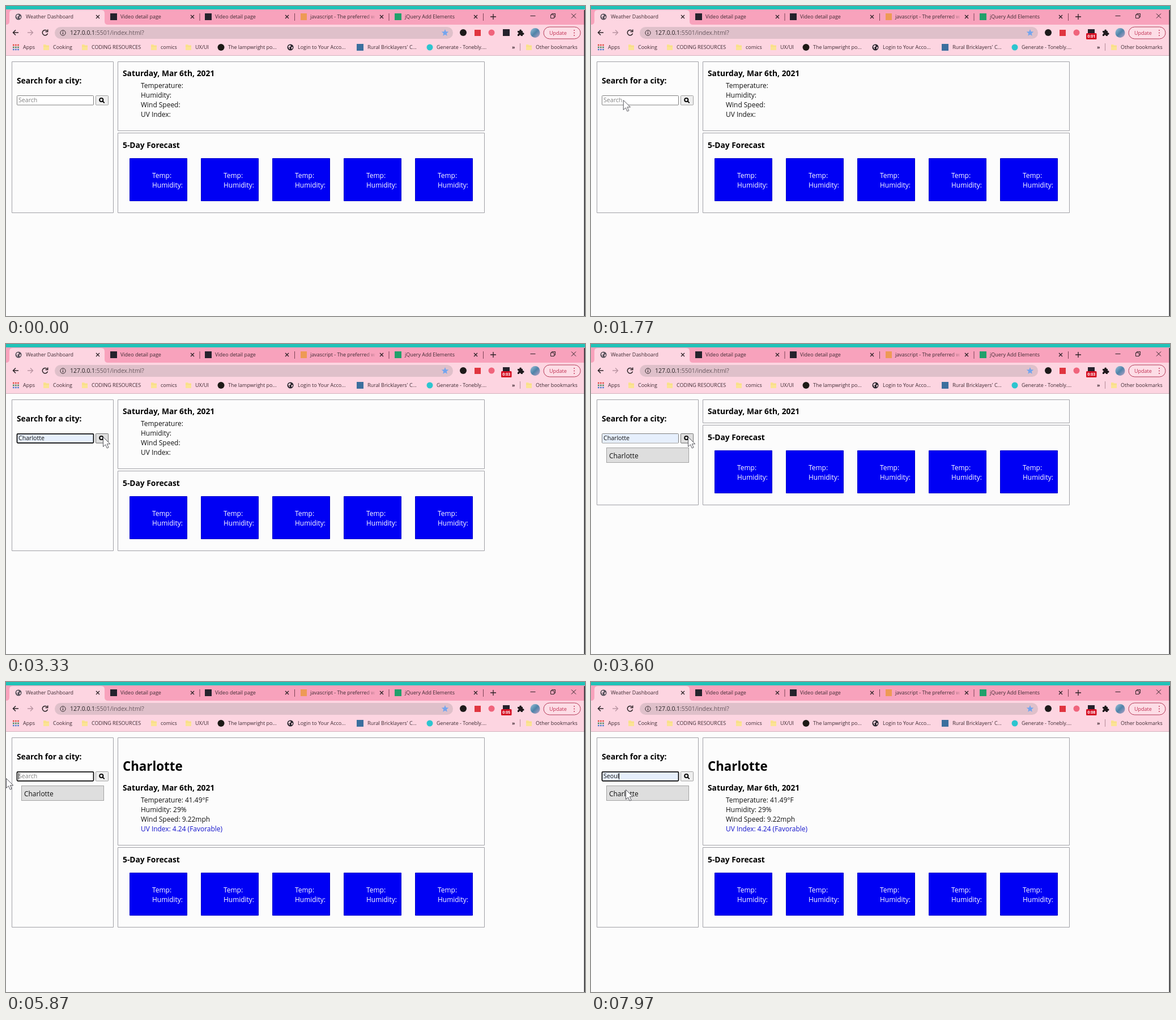
Write an HTML page that moves like this. It is 1022 by 548 pixels and loops after 8 s.

```html
<!DOCTYPE html>
<html lang="en">
<head>
<meta charset="utf-8">
<title>Weather Dashboard</title>
<style>
  html, body { margin: 0; width: 100%; height: 100%; overflow: hidden; background: #fcfcfc; }
  svg { display: block; }
  text { font-family: "Open Sans", "Noto Sans", sans-serif; white-space: pre; }
  .ui { font-size: 8.98px; fill: #3f2b33; }
  .url { font-size: 10.43px; fill: #2b2226; }
  .page { font-size: 11.95px; fill: #111; }
  .head { font-size: 13.8px; font-weight: 700; fill: #000; }
  .field { font-family: "Liberation Sans", Arial, sans-serif; font-size: 10.6px; fill: #111; }
  .badge { font-size: 7px; font-weight: 700; fill: #fff; }
  .panel { fill: none; stroke: #a0a0a6; }
  .line { fill: none; stroke: #2b2226; stroke-width: 1.3; }

  /* one loop is 8 s, so 1% is 80 ms */
  .anim { animation: 8s step-end infinite; }
  #empty { animation-name: empty; }
  #loading { animation-name: loading; }
  #result { animation-name: result; }
  #history { animation-name: history; }
  #pressed { animation-name: pressed; }
  #date { animation-name: date; }
  #forecast { animation-name: forecast; }
  #fill { animation-name: fill; }
  #focus { animation-name: focus; }
  #hint { animation-name: hint; }
  #first { animation-name: first; }
  #second { animation-name: second; }
  #caret { animation-name: caret; }
  #timer { animation-name: timer; }
  #digits { animation-name: digits; }
  #mouse { animation: mouse 8s ease-in-out infinite; }

  @keyframes empty { 0% { opacity: 1 } 43% { opacity: 0 } }
  @keyframes loading { 0% { opacity: 0 } 43% { opacity: 1 } 53% { opacity: 0 } }
  @keyframes result { 0% { opacity: 0 } 53% { opacity: 1 } }
  @keyframes history { 0% { opacity: 0 } 43% { opacity: 1 } }
  @keyframes pressed { 0% { opacity: 0 } 40% { opacity: 1 } 61% { opacity: 0 } }
  @keyframes date { 0% { transform: none } 53% { transform: translateY(68px) } }
  @keyframes forecast {
    0% { transform: none }
    43% { transform: translateY(-81px) }
    53% { transform: translateY(68px) }
  }
  @keyframes fill { 0% { opacity: 0 } 32.5% { opacity: 1 } 72% { opacity: 0 } 96% { opacity: 1 } }
  @keyframes focus { 0% { opacity: 0 } 24% { opacity: 1 } 42.5% { opacity: 0 } 66% { opacity: 1 } }
  @keyframes hint { 0% { opacity: 1 } 32.5% { opacity: 0 } 72% { opacity: 1 } 96% { opacity: 0 } }
  @keyframes first { 0% { opacity: 0 } 32.5% { opacity: 1 } 72% { opacity: 0 } }
  @keyframes second { 0% { opacity: 0 } 96% { opacity: 1 } }
  @keyframes caret {
    0% { opacity: 0; transform: none }
    24% { opacity: 1; transform: none }
    30.6% { opacity: 0; transform: none }
    32.5% { opacity: 1; transform: translateX(43px) }
    39.1% { opacity: 0; transform: none }
    72% { opacity: 1; transform: none }
    78.6% { opacity: 0; transform: none }
    85.2% { opacity: 1; transform: none }
    91.8% { opacity: 0; transform: none }
    96% { opacity: 1; transform: translateX(27px) }
  }
  @keyframes timer { 0% { opacity: 0 } 7.5% { opacity: 1 } }
  @keyframes digits {
    0% { transform: none }
    11.5% { transform: translateY(-20px) }
    24% { transform: translateY(-40px) }
    36.5% { transform: translateY(-60px) }
    49% { transform: translateY(-80px) }
    61.5% { transform: translateY(-100px) }
    74% { transform: translateY(-120px) }
    86.5% { transform: translateY(-140px) }
    99% { transform: translateY(-160px) }
  }
  @keyframes mouse {
    0%, 17% { transform: translate(-20px, 190px) }
    23%, 26% { transform: translate(60px, 165px) }
    31.5%, 34.5% { transform: translate(75px, 253px) }
    41%, 60% { transform: translate(171px, 164px) }
    65%, 66.5% { transform: translate(68px, 166px) }
    70.5%, 80% { transform: translate(0, 170px) }
    88%, 90% { transform: translate(52px, 168px) }
    94.5%, 100% { transform: translate(61px, 190px) }
  }
</style>
</head>
<body>
<svg width="1022" height="548" viewBox="0 0 1022 548">
  <defs>
    <linearGradient id="fade">
      <stop offset="0" stop-color="#f8a2bc" stop-opacity="0"/>
      <stop offset="1" stop-color="#f8a2bc"/>
    </linearGradient>
    <linearGradient id="photo" x2="1" y2="1">
      <stop offset="0" stop-color="#9cc4dc"/>
      <stop offset=".5" stop-color="#4f83a8"/>
      <stop offset="1" stop-color="#b9a3c8"/>
    </linearGradient>
    <path id="close" class="line" d="M-3-3 3 3M3-3-3 3"/>
    <path id="split" d="M0 13V26" stroke="#7d4356"/>
    <g id="folder">
      <path d="M-5-5h4l1.500 1.500H5V5H-5z" fill="#fbe394"/>
      <path d="M-5-2H5" stroke="#f3d374" stroke-width=".8"/>
    </g>
    <g id="globe">
      <circle r="5.500"/>
      <path d="M-4-1.500-1.500-4 1-3 0-1-2 0-1 2.500-2 3.500zM1.500 0 4-1 4 1.500 2 3.500z" fill="#fbd6e1"/>
    </g>
    <g id="day">
      <path d="M218.500 269.500h101v75h-101z" fill="#0000f4" stroke="#0000c8"/>
      <g class="page" style="fill:#fff">
        <text x="258" y="304">Temp:</text>
        <text x="258" y="321">Humidity:</text>
      </g>
    </g>
  </defs>

  <rect width="1022" height="548" fill="#fcfcfc"/>

  <!-- browser frame -->
  <rect width="1022" height="7" fill="#20c3b8"/>
  <rect y="6" width="1022" height="28" fill="#f8a2bc"/>
  <rect y="33" width="1022" height="54" fill="#fdd5e1"/>
  <path d="M0 33q6 0 6-6V13q0-6 6-6H168q6 0 6 6V27q0 6 6 6z" fill="#fdd5e1"/>
  <path d="M0 87.500H1022" stroke="#d5b3be"/>

  <g fill="#55505a"><use href="#globe" x="22" y="19"/></g>
  <g fill="#25222c">
    <rect x="184" y="13" width="12" height="12"/>
    <rect x="351" y="13" width="12" height="12"/>
  </g>
  <rect x="520" y="13" width="11" height="12" fill="#ee9a55"/>
  <rect x="686" y="13" width="12" height="12" fill="#22a06b"/>
  <g class="ui">
    <text x="35" y="22.300">Weather Dashboard</text>
    <text x="202" y="22.300">Video detail page</text>
    <text x="369" y="22.300">Video detail page</text>
    <text x="537" y="22.300">javascript - The preferred w</text>
    <text x="704" y="22.300">jQuery Add Elements</text>
  </g>
  <rect x="634" y="10" width="20" height="18" fill="url(#fade)"/>
  <use href="#close" x="162" y="19"/>
  <use href="#close" x="329" y="19"/>
  <use href="#close" x="496" y="19"/>
  <use href="#close" x="663" y="19"/>
  <use href="#close" x="829" y="19"/>
  <use href="#split" x="342"/>
  <use href="#split" x="509.500"/>
  <use href="#split" x="676"/>
  <use href="#split" x="842.500"/>
  <path class="line" d="M855 19h10M860 14v10"/>
  <path class="line" style="stroke-width:1" d="M925.500 17.500h9M961.500 15.500h6v6h-6zM963.500 15v-1.500h6v6H968M998 13.500l8 8M1006 13.500l-8 8"/>

  <!-- address bar -->
  <rect x="86" y="37" width="703" height="21" rx="10.500" fill="#dfc0ca"/>
  <path class="line" style="stroke-width:1.500" d="M22 47H12.500M17 42.500 12.500 47l4.500 4.500"/>
  <path class="line" style="stroke:#b893a1" d="M38 47h9.500M43 42.500l4.500 4.500-4.500 4.500"/>
  <path class="line" style="stroke-width:1.500" d="M72.500 44A4.700 4.700 0 1 0 73.500 48.500M73.700 41.500V45.500H69.500"/>
  <circle cx="100.500" cy="47.500" r="4.600" class="line" style="stroke-width:1"/>
  <path class="line" style="stroke-width:1.200" d="M100.500 46.800v3.200M100.500 44.600v1.200"/>
  <text class="url" x="113" y="51.300">127.0.0.1<tspan fill="#6a5860">:5501/index.html?</tspan></text>
  <path d="M775 41l1.700 4.200 4.500.3-3.500 2.900 1.100 4.400-3.800-2.400-3.800 2.400 1.100-4.400-3.500-2.900 4.500-.3z" fill="#74a5ee"/>

  <circle cx="807" cy="47" r="6" fill="#1d1a1a"/>
  <rect x="827" y="42" width="11" height="11" fill="#e0353f"/>
  <circle cx="857" cy="47" r="5.500" fill="#f0647c"/>
  <rect x="877" y="41" width="12" height="12" fill="#25222c"/>
  <path d="M904 44h2.300a1.900 1.900 0 1 1 3.600 0H912v3.200a1.900 1.900 0 1 1 0 3.600V53h-3a1.700 1.700 0 0 0-3.400 0H903v-3a1.700 1.700 0 0 0 0-3.400V44z" fill="#1f1a1d"/>
  <circle cx="934" cy="47.500" r="8.500" fill="url(#photo)"/>
  <rect x="949" y="37" width="65" height="21" rx="10.500" fill="#fddde6" stroke="#b43a58"/>
  <text x="959" y="50.800" class="ui" style="fill:#c02c50">Update</text>
  <path d="M1003 43v.1M1003 47.500v.1M1003 52v.1" stroke="#c02c50" stroke-width="1.800" stroke-linecap="round"/>
  <g id="timer" class="anim">
    <rect x="874" y="48" width="18.500" height="11" rx="1.500" fill="#d50f24"/>
    <svg x="874" y="48" width="19" height="11">
      <g id="digits" class="anim badge">
        <text x="2.200" y="8.200">0:00</text>
        <text x="2.200" y="28.200">0:01</text>
        <text x="2.200" y="48.200">0:02</text>
        <text x="2.200" y="68.200">0:03</text>
        <text x="2.200" y="88.200">0:04</text>
        <text x="2.200" y="108.200">0:05</text>
        <text x="2.200" y="128.200">0:06</text>
        <text x="2.200" y="148.200">0:07</text>
        <text x="2.200" y="168.200">0:08</text>
      </g>
    </svg>
  </g>

  <!-- bookmarks -->
  <g stroke-width="2.600" stroke-dasharray="2.600 1.500">
    <path d="M12 69H23" stroke="#e0483f"/>
    <path d="M12 73H23" stroke="#4a8a62"/>
    <path d="M12 77H23" stroke="#4b7fd0"/>
  </g>
  <use href="#folder" x="71" y="73"/>
  <use href="#folder" x="139" y="73"/>
  <use href="#folder" x="261" y="73"/>
  <use href="#folder" x="322" y="73"/>
  <use href="#folder" x="923" y="73"/>
  <circle cx="379.500" cy="73" r="6" fill="#1d1a16"/>
  <g fill="#26232b"><use href="#globe" x="502" y="73"/></g>
  <rect x="619" y="67" width="12" height="12" fill="#3b6f9e"/>
  <circle cx="748" cy="73" r="5.500" fill="#2cc5cf"/>
  <g class="ui">
    <text x="30" y="76.200">Apps</text>
    <text x="83" y="76.200">Cooking</text>
    <text x="151" y="76.200">CODING RESOURCES</text>
    <text x="273" y="76.200">comics</text>
    <text x="334" y="76.200">UX/UI</text>
    <text x="392" y="76.200">The lampwright po...</text>
    <text x="515" y="76.200">Login to Your Acco...</text>
    <text x="638" y="76.200">Rural Bricklayers' C...</text>
    <text x="760" y="76.200">Generate - Tonebly....</text>
    <text x="893" y="76.200" font-weight="700">»</text>
    <text x="935" y="76.200">Other bookmarks</text>
  </g>
  <path d="M907.500 66v13" stroke="#b48a98"/>

  <!-- search column -->
  <text class="head" x="19" y="137.300">Search for a city:</text>
  <rect x="19.500" y="158.500" width="135" height="16.500" rx="1" fill="#fff" stroke="#808080"/>
  <rect id="fill" class="anim" x="20" y="159" width="134" height="15.500" fill="#e6effc"/>
  <rect id="focus" class="anim" x="19.500" y="158.800" width="135" height="16" rx="1.500" fill="none" stroke="#111" stroke-width="1.800"/>
  <g class="field">
    <text id="hint" class="anim" x="22" y="170.300" style="fill:#808080">Search</text>
    <text id="first" class="anim" x="22" y="170.300">Charlotte</text>
    <text id="second" class="anim" x="22" y="170.300">Seoul</text>
  </g>
  <path id="caret" class="anim" d="M22.500 161v11.500" stroke="#111"/>
  <rect x="158.500" y="158.500" width="22" height="16.500" rx="1" fill="#efefef" stroke="#a0a0a0"/>
  <rect id="pressed" class="anim" x="158.500" y="158.500" width="22" height="16.500" rx="1" fill="#e0e0e0" stroke="#777"/>
  <g fill="none" stroke="#000" stroke-width="1.900">
    <circle cx="168.300" cy="166" r="3.100"/>
    <path d="M170.500 168.200l3.200 3.200"/>
  </g>
  <g id="history" class="anim">
    <rect x="27.500" y="183.500" width="145" height="26" fill="#dedede" stroke="#a4a4a4"/>
    <text class="page" x="32" y="202">Charlotte</text>
  </g>

  <!-- current weather -->
  <g id="empty" class="anim">
    <path class="panel" d="M10.500 98.500h179v267h-179zM197.500 98.500h647v122h-647z"/>
    <g class="page">
      <text x="238" y="145">Temperature:</text>
      <text x="238" y="162">Humidity:</text>
      <text x="238" y="179">Wind Speed:</text>
      <text x="238" y="196">UV Index:</text>
    </g>
  </g>
  <path id="loading" class="anim panel" d="M10.500 98.500h179v186h-179zM197.500 98.500h647v41h-647z"/>
  <g id="result" class="anim">
    <path class="panel" d="M10.500 98.500h179v335h-179zM197.500 98.500h647v190h-647z"/>
    <text class="head" x="206" y="156.500" style="font-size:22.300px">Charlotte</text>
    <g class="page">
      <text x="238" y="213">Temperature: 41.49°F</text>
      <text x="238" y="230">Humidity: 29%</text>
      <text x="238" y="247">Wind Speed: 9.22mph</text>
      <text x="238" y="264" style="fill:#1414cc">UV Index: 4.24 (Favorable)</text>
    </g>
  </g>
  <text id="date" class="anim head" x="206" y="124">Saturday, Mar 6th, 2021</text>

  <g id="forecast" class="anim">
    <path class="panel" d="M197.500 224.500h647v141h-647z"/>
    <text class="head" x="206" y="251">5-Day Forecast</text>
    <use href="#day"/>
    <use href="#day" x="126"/>
    <use href="#day" x="252"/>
    <use href="#day" x="378"/>
    <use href="#day" x="504"/>
  </g>

  <path d="M1021.200 7V548" stroke="#2a2a2e" stroke-width="1.600"/>
  <path id="mouse" d="M.5.500V17.500l4-3.700 2.800 6.300 2.800-1.200-2.800-6.200h5.500z" fill="#fff" stroke="#55555c"/>
</svg>
</body>
</html>
```
